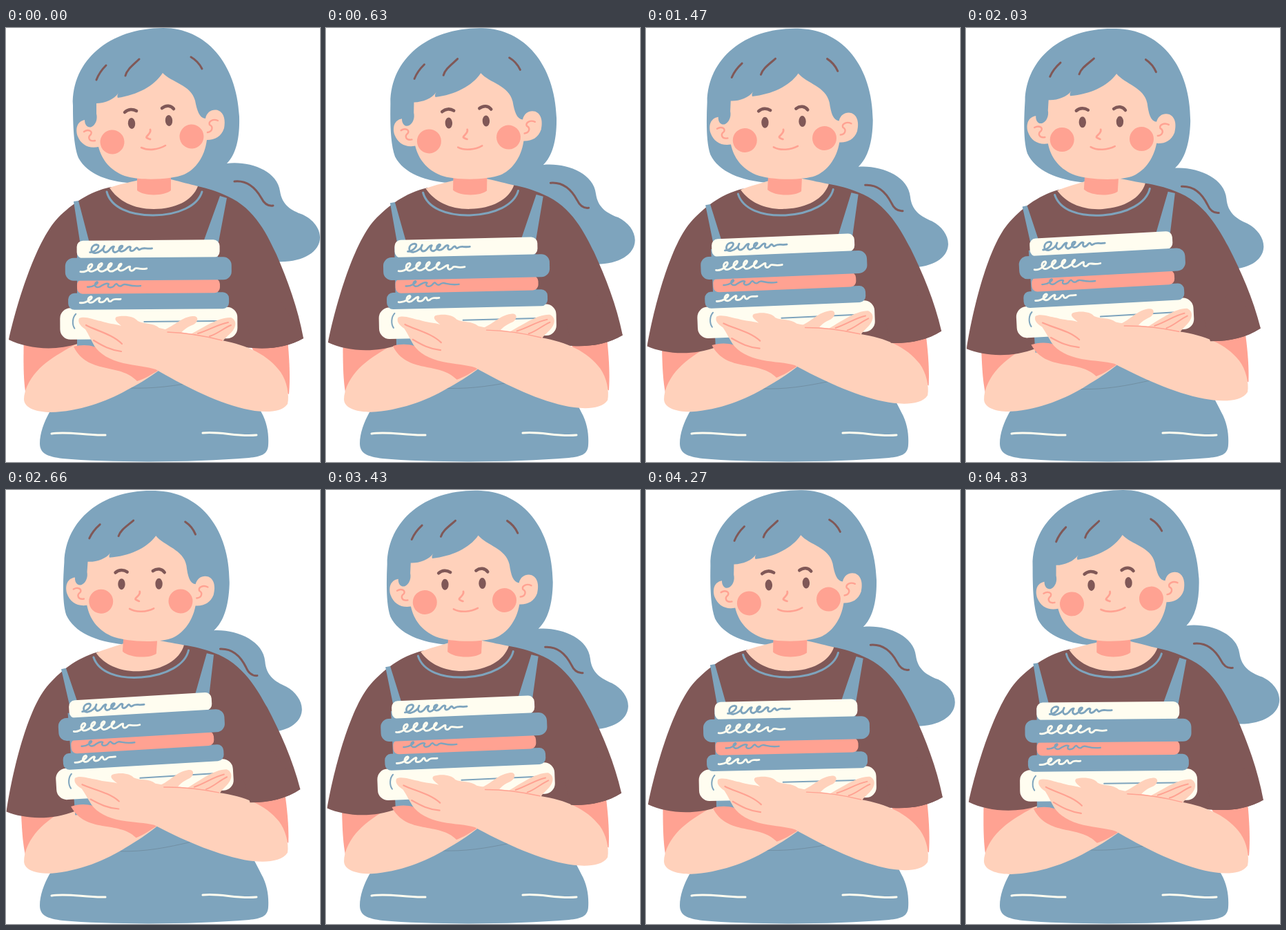
An HTML page with a canvas that plays this animation: 455 by 628 pixels, repeating every 4.9 s.

```html
<!DOCTYPE html>
<html lang="en">
<head>
<meta charset="utf-8">
<style>
html, body { margin: 0; width: 100%; height: 100%; overflow: hidden; background: #fff; }
canvas { display: block; width: 455px; height: 628px; }
</style>
</head>
<body>
<canvas id="stage" width="455" height="628"></canvas>
<script>
const ctx = document.getElementById('stage').getContext('2d');
const BLUE = '#7ea4bd', BROWN = '#805857', SKIN = '#ffd1bb', SALMON = '#ffa292', CREAM = '#fffdf0';
const STEP = 70, STEPS = 70;

const paths = new Map();
function path(d) {
  if (!paths.has(d)) paths.set(d, new Path2D(d));
  return paths.get(d);
}
function fill(color, d) {
  ctx.fillStyle = color;
  ctx.fill(path(d));
}
function line(color, width, d) {
  ctx.strokeStyle = color;
  ctx.lineWidth = width;
  ctx.stroke(path(d));
}
function oval(color, x, y, rx, ry = rx) {
  ctx.fillStyle = color;
  ctx.beginPath();
  ctx.ellipse(x, y, rx, ry, -0.06, 0, 7);
  ctx.fill();
}
function book(color, left, right, top, bottom, r) {
  ctx.fillStyle = color;
  ctx.beginPath();
  ctx.roundRect(left, top, right - left, bottom - top, r);
  ctx.fill();
}

// Draws a group turned about a pivot, optionally shifted sideways.
function posed(x, y, angle, shift, draw) {
  ctx.save();
  ctx.translate(x + shift, y);
  ctx.rotate(angle);
  ctx.translate(-x, -y);
  draw();
  ctx.restore();
}

function hair() {
  fill(BLUE, `M97 112 C95 47 150 0 228 0 C289 0 334 50 338 128 C339 160 333 183 320 196
    C352 192 393 206 397 236 C400 256 413 264 430 270 C445 277 455 290 455 303
    C455 325 428 340 392 338 L300 260 L192 225 C150 224 118 212 105 188 C98 170 97 140 97 112 Z`);
  line(BROWN, 3, 'M331 222 C350 220 362 232 370 246 C374 254 380 258 387 257');
}

function apron() {
  fill(BLUE, `M63 556 L130 475 H300 L335 500 C350 516 361 538 370 556 C379 572 381 589 380 604
    C379 617 370 620 352 622 C270 629 150 629 82 623 C60 620 49 616 49 601 C49 587 55 570 63 556 Z`);
  line(CREAM, 3, 'M66 587 C90 583 115 590 144 589');
  line(CREAM, 3, 'M285 586 C310 583 335 592 363 589');
}

function waistSeam() {
  line('#6c8799', 0.7, 'M165 520 C200 523 230 520 272 513');
}

function upperArms() {
  fill(SALMON, 'M26 440 L110 440 L90 480 L29 532 C25 510 25 485 26 440 Z');
  fill(SALMON, 'M345 440 H407 C411 480 412 505 410 530 L380 510 Z');
  fill(SKIN, `M28 525 C40 490 72 474 102 457 C150 470 200 485 225 493 C205 508 190 516 175 524
    C145 541 105 555 65 556 C45 556 26 550 26 537 Q26 532 28 525 Z`);
}

function torso() {
  fill(BROWN, `M152 230 C120 237 96 254 75 275 C42 310 14 405 4 451 C30 464 70 468 104 457
    L110 440 H300 V460 L358 463 C385 465 410 461 431 449 C423 405 408 365 392 328
    C380 303 362 261 320 243 C305 236 292 232 278 229 Z`);
  fill(SKIN, `M150 231 C165 226 180 223 192 220 L239 219 C255 223 266 226 278 229
    C270 250 245 262 214 262 C185 262 162 250 150 231 Z`);
  line(BLUE, 3, 'M146 237 C152 260 180 271 213 271 C250 271 278 257 284 237');
  fill(BLUE, 'M98 251 L105 250 L122 315 H284 L310 243 L320 246 L307 315 V463 H103 V315 H108 Z');
}

function head() {
  fill(SALMON, 'M190 208 H239 V235 C230 243 200 244 190 235 Z');
  fill(SKIN, `M131 109 C143 109 157 103 163 94 C161 97 161 99 162 101 C190 97 215 84 227 65
    C240 79 268 82 274 105 C277 120 280 130 289 131 C291 121 299 117 307 119
    C317 123 318 135 316 145 C312 157 303 162 291 162 C288 187 274 205 258 212
    C238 220 192 221 172 214 C151 206 139 191 134 172 C120 175 109 169 104 157
    C100 146 103 135 114 133 C114 141 119 145 124 143 C130 140 133 132 131 124 Z`);
  line(BROWN, 3, 'M131 75 C134 67 139 60 145 54');
  line(BROWN, 3, 'M173 69 C175 60 185 53 193 45');
  line(BROWN, 3, 'M268 42 C275 46 281 53 284 59');
  line(BROWN, 4.5, 'M172 122 C177 117 184 117 189 120');
  line(BROWN, 4.5, 'M226 116 C232 111 239 112 243 117');
  oval(BROWN, 182, 138, 5.2, 8);
  oval(BROWN, 236, 134, 5.2, 8);
  oval(SALMON, 154, 165, 17.5);
  oval(SALMON, 269, 157, 17.5);
  line(SALMON, 2.8, 'M209 147 C211 153 201 157 204 159 C206 160 208 161 209 161');
  line(SALMON, 2.6, 'M196 173 C206 178 221 176 231 170');
  line(SALMON, 2.4, 'M113 150 C119 146 126 149 123 154 C118 158 120 165 129 163');
  line(SALMON, 2.4, 'M307 134 C300 131 293 135 295 140 C301 143 299 150 292 151');
}

function books() {
  book(CREAM, 78, 335, 404.5, 450, 15);
  line(BLUE, 2, 'M101 413 C96 418 95 428 99 434');
  line(BLUE, 2, 'M200 425 L326 424.5');
  book(BLUE, 90, 323, 383, 407, 9);
  book(SALMON, 103, 310, 363, 384, 8);
  book(CREAM, 103, 310, 307, 333, 9);
  book(BLUE, 86, 327, 332, 365, 12);
  line(BLUE, 2.8, `M122 324 C130 324 139 314 132 313 C123 313 121 326 130 325 C137 324 142 319 143 315
    C139 322 143 327 149 322 C152 319 154 315 157 316 C153 322 157 327 163 322 C170 317 171 314 167 315
    C161 318 165 327 173 321 C177 317 179 315 181 317 C178 324 184 324 188 319
    C192 315 191 323 195 320 C200 317 203 320 212 319`);
  line(CREAM, 2.8, `M108 352 C117 354 129 343 124 341 C117 341 117 355 127 351 C138 346 142 340 138 340
    C131 342 132 355 142 351 C152 346 156 340 152 340 C146 342 146 355 156 351 C166 346 170 340 166 341
    C161 344 162 354 170 350 C176 347 178 344 180 345 C178 352 183 353 187 348 C190 346 193 350 204 348`);
  line(BLUE, 2.4, `M118 374 C126 375 136 368 132 367 C127 368 128 377 136 374 C142 370 146 368 149 370
    C144 376 154 377 158 371 C162 367 161 375 167 373 C174 367 176 375 195 373`);
  line(CREAM, 2.8, `M107 397 C117 398 128 389 123 388 C117 389 117 400 126 396 C133 390 136 389 136 391
    C131 398 141 398 145 392 C150 388 146 397 152 395 C157 390 159 393 166 392`);
}

function arms() {
  fill(SALMON, `M98 461 C112 457 130 458 145 470 C175 480 210 485 223 494 C210 502 200 508 190 511
    C165 484 118 502 98 461 Z`);
  posed(206, 378, -0.007, 0, books);
  fill(SKIN, 'M215 441 C242 436 250 419 270 417 C280 416 279 425 272 429 C262 433 256 437 250 446 Z');
  fill(SKIN, `M262 446 C287 433 308 418 326 419 C335 423 334 433 326 441 C319 448 314 451 314 456 Z`);
  line(SALMON, 2, 'M278 442 C295 437 306 429 322 426');
  line(SALMON, 2, 'M295 446 C306 443 314 435 326 430');
  fill(SKIN, `M106 420 C114 416 126 422 137 424 C148 428 158 428 167 431 C163 427 155 422 160 418
    C171 415 186 417 191 424 C200 429 213 426 222 434 C245 440 282 443 313 452
    C350 459 380 473 398 498 C407 511 411 531 408 544 C398 559 366 556 345 551
    C300 540 253 515 217 494 C205 490 188 489 170 485 C150 480 136 472 128 460
    C123 451 120 444 115 436 C106 430 104 425 106 420 Z`);
  line(SALMON, 1.4, 'M234 440 C262 441 290 446 313 452');
  line(SALMON, 2.2, 'M116 430 C131 438 154 443 168 457');
  line(SALMON, 2.2, 'M127 452 C140 460 151 466 167 468');
}

function rightSleeve() {
  fill(BROWN, 'M431 449 C410 461 385 465 357 463 L350 430 L395 390 Z');
}

function draw(now) {
  const step = Math.floor(now / STEP) % STEPS;
  const sway = Math.min(step, STEPS - step);
  const withHead = part => posed(213, 230, sway * 0.0021, sway * -0.65, part);
  const withBody = part => posed(205, 505, sway * -0.00225, 0, part);
  const withArms = part => posed(40, 535, sway * -0.001625, 0, part);

  ctx.fillStyle = '#fff';
  ctx.fillRect(0, 0, 455, 628);
  ctx.lineCap = ctx.lineJoin = 'round';
  withHead(hair);
  apron();
  withBody(waistSeam);
  withArms(upperArms);
  withBody(torso);
  withHead(head);
  withArms(arms);
  withBody(rightSleeve);
}

const start = performance.now();
function tick() {
  draw(performance.now() - start);
  requestAnimationFrame(tick);
}
tick();
</script>
</body>
</html>
```
